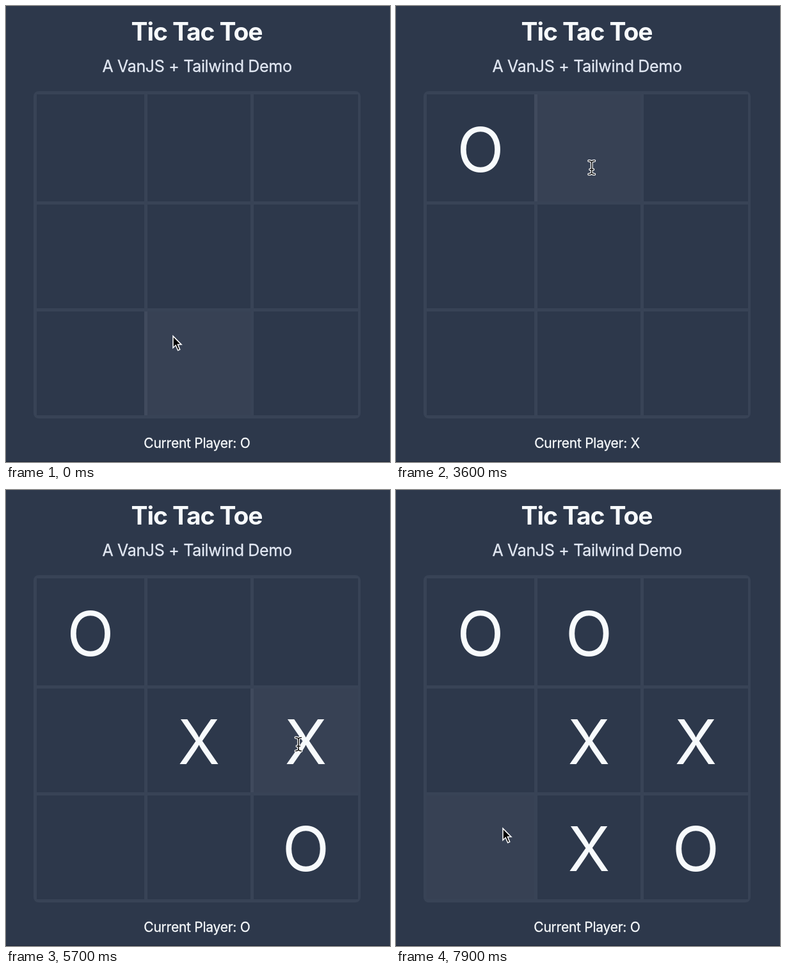
An HTML page that plays this animation: 600 by 712 pixels, repeating every 8000 ms.

```html
<!DOCTYPE html>
<html lang="en">
<head>
<meta charset="utf-8">
<title>Tic Tac Toe</title>
<style>
html, body { margin: 0; width: 100%; height: 100%; overflow: hidden; background: #2d384b; }
svg { display: block; }
text { font-family: Inter, Roboto, sans-serif; text-anchor: middle; fill: #f7fafc; }
#title { font-size: 39px; font-weight: 700; letter-spacing: -1.1px; }
#subtitle { font-size: 25px; letter-spacing: -.32px; fill: #e2e8f3; stroke: #e2e8f3; stroke-width: .3; }
#status { font-size: 21px; letter-spacing: -.25px; stroke: #f7fafc; stroke-width: .3; }
#marks { font-size: 96px; }
#beam path { fill: none; stroke-linecap: round; }
</style>
</head>
<body>
<svg width="600" height="712" viewBox="0 0 600 712">
  <rect width="600" height="712" fill="#2d384b"/>
  <rect y="711" width="600" height="1" fill="#202839"/>
  <text id="title" x="298" y="54">Tic Tac Toe</text>
  <text id="subtitle" x="298.5" y="102.5">A VanJS + Tailwind Demo</text>
  <rect x="43" y="133" width="511" height="511" rx="8" fill="#384356"/>
  <g id="cells"></g>
  <rect id="edge" width="5" fill="#404a5d"/>
  <g id="marks"></g>
  <text id="status" x="298.5" y="690"></text>
  <path id="arrow" d="M1 2.4V20.8L5.2 16.8 8.7 24.7 11.7 23.4 8.4 15.6H14Z" fill="#000" stroke="#fff" stroke-width="1.5"/>
  <g id="beam">
    <path id="outline" stroke="#fff" stroke-width="4"/>
    <path id="stem" stroke="#111" stroke-width="1.6"/>
  </g>
</svg>
<script>
const LOOP = 8000, STEP = 100, GAP = 5;

// Cell starts along each axis, ending with the outer edge
const xs = [48, 221, 387, 555], ys = [138, 310, 477, 644];

// Where the pointer arrives, when, and when it clicks there
const stops = [
  { t: 0, x: 260, y: 513 },
  { t: 300, x: 84, y: 520 },
  { t: 600, x: 158.5, y: 220.5, press: 900 },
  { t: 1600, x: 393, y: 214 },
  { t: 2000, x: 343, y: 230 },
  { t: 2400, x: 251.5, y: 358.5 },
  { t: 2900, x: 291, y: 467 },
  { t: 3700, x: 306, y: 248 },
  { t: 4300, x: 289, y: 382.5, press: 4400 },
  { t: 4900, x: 470, y: 555, press: 5000 },
  { t: 5500, x: 457, y: 397, press: 5600 },
  { t: 6200, x: 289, y: 216.5, press: 6300 },
  { t: 6900, x: 289, y: 559, press: 7000 },
  { t: 7900, x: 166, y: 526 }
];

const $ = id => document.getElementById(id);
const set = (el, attrs) => Object.entries(attrs).forEach(([key, value]) => el.setAttribute(key, value));

function add(parent, tag, attrs) {
  const el = document.createElementNS("http://www.w3.org/2000/svg", tag);
  set(el, attrs);
  return $(parent).appendChild(el);
}

const cells = Array.from({ length: 9 }, (_, i) => {
  const c = i % 3, r = Math.floor(i / 3);
  const x = xs[c], y = ys[r];
  const width = xs[c + 1] - GAP - x, height = ys[r + 1] - GAP - y;
  const midX = x + width / 2;
  return {
    x, y, width, height, midX,
    box: add("cells", "rect", { x, y, width, height }),
    mark: add("marks", "text", { x: midX, y: y + height / 2 + 37 })
  };
});

const cellAt = ({ x, y }) => cells.find(cell =>
  x >= cell.x && x < cell.x + cell.width && y >= cell.y && y < cell.y + cell.height);

const clicks = stops.filter(stop => stop.press).map(stop => ({ at: stop.press, cell: cellAt(stop) }));

for (const id of ["outline", "stem"])
  set($(id), { d: "M-4.5-10.5Q0-10.5 0-7.5V7.5Q0 10.5-4.5 10.5M4.5-10.5Q0-10.5 0-7.5M0 7.5Q0 10.5 4.5 10.5M-2.5 3H2.5" });

function pointerAt(t) {
  const n = stops.findIndex(stop => stop.t > t);
  if (n < 0) return stops[stops.length - 1];
  const from = stops[n - 1], to = stops[n];
  const leave = from.press ? from.press + 2 * STEP : from.t;
  const k = Math.sin(Math.max(0, (t - leave) / (to.t - leave)) * Math.PI / 2);
  return { x: from.x + (to.x - from.x) * k, y: from.y + (to.y - from.y) * k };
}

function draw(t) {
  const pointer = pointerAt(t), hover = cellAt(pointer);
  const pressed = clicks.find(({ at }) => t >= at && t < at + STEP);
  const placed = clicks.filter(({ at }) => t >= at + STEP);

  for (const cell of cells) {
    const fill = pressed && pressed.cell === cell ? "#232d3d" : cell === hover ? "#374154" : "#2d384b";
    set(cell.box, { fill });
    cell.mark.textContent = "";
  }
  placed.forEach(({ cell }, i) => cell.mark.textContent = "OX"[i % 2]);
  $("status").textContent = "Current Player: " + "OX"[placed.length % 2];

  const lit = hover && hover.x > xs[0];
  $("edge").style.display = lit ? "" : "none";
  if (lit) set($("edge"), { x: hover.x - GAP, y: hover.y, height: hover.height });

  // The pointer turns into a text cursor over the middle of a cell
  const overText = hover && Math.abs(pointer.x - hover.midX) < 20;
  for (const [id, on] of [["beam", overText], ["arrow", !overText]]) {
    $(id).style.display = on ? "" : "none";
    set($(id), { transform: `translate(${pointer.x} ${pointer.y})` });
  }
}

const start = performance.now();
function tick() {
  const t = (performance.now() - start) % LOOP;
  draw(Math.floor(t / STEP) * STEP);
  requestAnimationFrame(tick);
}
tick();
</script>
</body>
</html>
```
